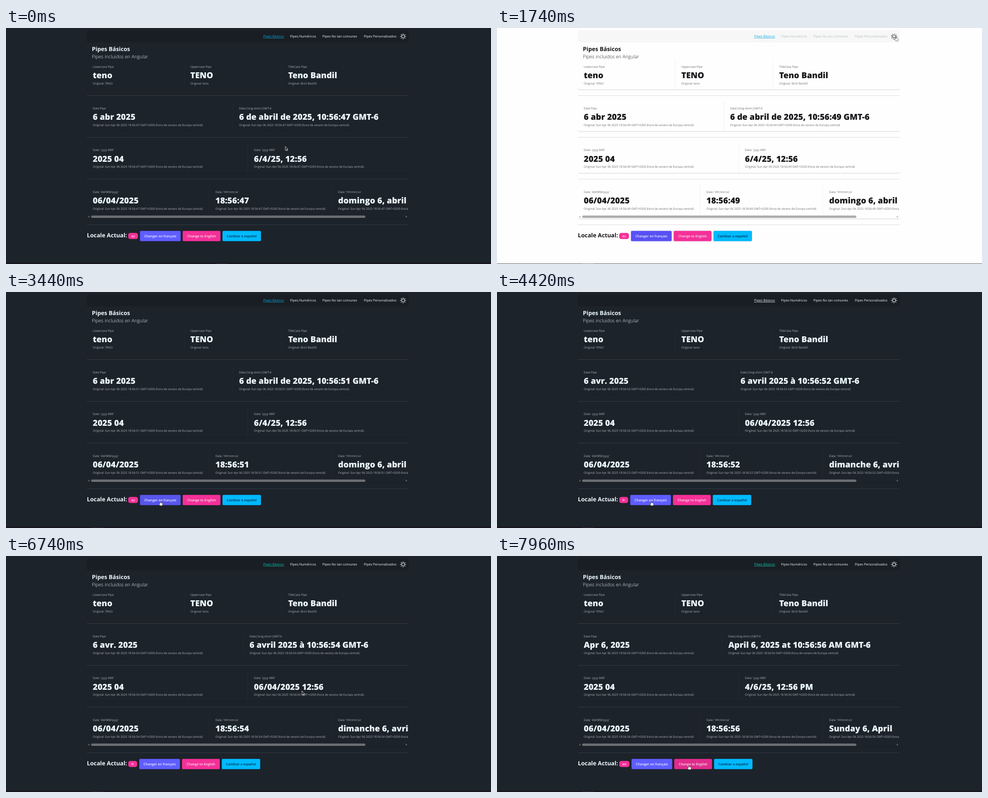
An HTML page that plays this animation: 1073 by 522 pixels, repeating every 7990 ms.

```html
<!DOCTYPE html>
<html lang="es">
<head>
<meta charset="utf-8">
<title>Pipes Básicos</title>
<style>
html, body { margin: 0; width: 100%; height: 100%; overflow: hidden; background: #1d232a; }
svg {
  display: block; width: 1073px; height: 522px;
  font-family: "Open Sans", "Noto Sans", sans-serif;
  text-rendering: geometricPrecision;
  --bg: #1d232a; --nav: #191e24; --ink: #ecf9ff; --soft: #acb6be;
  --line: #343a41; --dash: #2c3239; --thumb: #6c6f73; --strip: #191620; --tab: #37323f;
  --shadow: rgba(0, 0, 0, .1);
}
svg.light {
  --bg: #fefefe; --nav: #f7f7f7; --ink: #18181b; --soft: #6a6a6c;
  --line: #dfdfe0; --dash: #e6e6e7; --thumb: #adadad; --strip: #fefefe; --tab: #777;
  --shadow: rgba(0, 0, 0, .18);
}
.bg { fill: var(--bg); }
.nav { fill: var(--nav); }
.card { fill: var(--bg); filter: drop-shadow(0 1px .7px var(--shadow)); }
.hr { fill: var(--line); }
.dash { stroke: var(--dash); stroke-width: .8; stroke-dasharray: 2 1; }
.thumb { fill: var(--thumb); }
.strip { fill: var(--strip); }
.tab { fill: var(--tab); }
.small { font-size: 6.45px; fill: var(--soft); }
.value { font-size: 18.2px; font-weight: 800; fill: var(--ink); }
.title { font-size: 12.75px; font-weight: 700; fill: var(--ink); }
.sub { font-size: 10.55px; font-weight: 300; fill: var(--ink); }
.link { font-size: 7.35px; fill: var(--link); }
.active { fill: var(--active); text-decoration: underline; }
.btn { filter: drop-shadow(0 .8px .8px rgba(0, 0, 0, .2)); }
.label { font-size: 7.4px; font-weight: 600; text-anchor: middle; }
.icon { color: var(--ink); }
</style>
</head>
<body>
<svg id="stage" viewBox="0 0 1073 522" xmlns="http://www.w3.org/2000/svg">
  <defs><clipPath id="page"><rect x="179" y="0" width="712" height="522"/></clipPath></defs>
  <rect class="bg" width="1073" height="522"/>
  <rect class="nav" x="179" y="5" width="712" height="27" rx="4"/>
  <g id="frame"></g>
  <g id="stats" clip-path="url(#page)"></g>
  <g id="footer"></g>
  <g class="icon" transform="translate(878.5 18.5)">
    <g id="sun" fill="none" stroke="currentColor" stroke-width="1.3" stroke-linecap="round">
      <circle r="3.3"/>
      <path id="rays"/>
    </g>
    <path id="moon" fill="none" stroke="currentColor" stroke-width="1.2" stroke-linejoin="round"
      d="M5.9 2.2A5.1 5.1 0 0 1-1.6-5.8A6.3 6.3 0 1 0 5.9 2.2Z"/>
  </g>
  <rect class="strip" y="519" width="1073" height="3"/>
  <rect id="edge" y="521" width="1073" height="1" fill="#55565a"/>
  <rect id="tab" class="tab" y="521" width="27" height="1"/>
  <g id="ripple">
    <circle r="5.6" fill="#f7a41d" fill-opacity=".75"/>
    <circle r="3.2" fill="none" stroke="#ffd75e" stroke-width="1.2"/>
  </g>
  <g id="cursor">
    <path id="arrow" d="M0 0V8.6L2 6.9L3.3 9.7L4.7 9.1L3.4 6.3H6Z" fill="#111" stroke="#fff" stroke-width=".8" stroke-linejoin="round"/>
    <path id="hand" d="M-.8 .8Q0-.5 .8 .8V3.5Q2 2.8 2.6 3.8Q3.7 3.2 4.1 4.2Q5.4 3.8 5.5 5.1V7L4.6 9.7H.1L-2.6 6.4Q-2.6 5.2-.8 6Z" fill="#fff" stroke="#111" stroke-width=".6" stroke-linejoin="round"/>
  </g>
</svg>
<script>
const LOOP = 7990, FADE = 200;
const LIGHT_ON = 1740, LIGHT_OFF = 2390, FRENCH = 4420, ENGLISH = 7780;
const CLICKS = [1470, 2160, 4110, 7520], CLICK_TIME = 130;
// [time, seconds shown]
const TICKS = [[0, 47], [40, 48], [1055, 49], [2160, 50], [3080, 51], [4100, 52],
  [5380, 53], [6380, 54], [7380, 55], [ENGLISH, 56]];
// [time, x, y] of the pointer tip
const PATH = [[0, 618, 262], [30, 618, 262], [820, 864, 36], [1000, 880, 17], [1330, 882, 19],
  [2600, 882, 19], [2960, 730, 160], [3400, 341, 463], [4870, 341, 463], [5650, 196, 262],
  [5860, 193, 246], [6080, 188, 178], [6480, 786, 203], [7200, 424, 467], [7310, 424, 463], [LOOP, 424, 463]];
const LOCALES = {
  es: { shift: 0, badge: 21.5, split: 502, date: '6 abr 2025', long: s => `6 de abril de 2025, 10:56:${s} GMT-6`, short: '6/4/25, 12:56', day: 'domingo 6, abril' },
  fr: { shift: -1.6, badge: 19.7, split: 525, date: '6 avr. 2025', long: s => `6 avril 2025 à 10:56:${s} GMT-6`, short: '06/04/2025 12:56', day: 'dimanche 6, avril' },
  en: { shift: 1.2, badge: 22.6, split: 498, date: 'Apr 6, 2025', long: s => `April 6, 2025 at 10:56:${s} AM GMT-6`, short: '4/6/25, 12:56 PM', day: 'Sunday 6, April' }
};
const PURPLE = [96, 93, 255], INDIGO = [66, 42, 213], PINK = [244, 48, 152];
const PALE = [236, 249, 255], DARK = [24, 24, 27], CYAN = [9, 169, 220], TEAL = [5, 199, 174];

const $ = id => document.getElementById(id);
const stage = $('stage');
const clamp = v => Math.max(0, Math.min(1, v));
const mix = (a, b, p) => a.map((v, i) => v + (b[i] - v) * p);
const rgb = c => `rgb(${c.map(Math.round)})`;
const text = (x, y, cls, str) => `<text x="${x}" y="${y}" class="${cls}">${str}</text>`;
const rect = (x, y, w, h, cls, rx = 0) => `<rect x="${x}" y="${y}" width="${w}" height="${h}" rx="${rx}" class="${cls}"/>`;
const rowTop = row => 70.5 + row * 92.4;

function drawFrame() {
  let out = text(569, 21.3, 'link active', 'Pipes Básicos')
    + text(628.5, 21.3, 'link', 'Pipes Numéricos')
    + text(700, 21.3, 'link', 'Pipes No tan comunes')
    + text(791.7, 21.3, 'link', 'Pipes Personalizados');
  for (let row = 0; row < 4; row++) out += rect(179, rowTop(row), 712, row < 3 ? 65.5 : 74, 'card', 4);
  for (const y of [149, 241.3, 333.7, 434.6]) out += rect(179, y, 712, 1.1, 'hr');
  out += rect(188.5, 414.7, 606.5, 5.4, 'thumb', 2.7)
    + '<path class="thumb" d="M181.5 417.4l3-2.4v4.8zM887.5 417.4l-3-2.4v4.8z"/>'
    + text(190, 51.2, 'title', 'Pipes Básicos')
    + text(190, 66.8, 'sub', 'Pipes incluidos en Angular');
  $('frame').innerHTML = out;
  $('rays').setAttribute('d', Array.from({ length: 8 }, (_, i) => {
    const c = Math.cos(i * Math.PI / 4), s = Math.sin(i * Math.PI / 4);
    return `M${5.4 * c} ${5.4 * s}L${6.1 * c} ${6.1 * s}`;
  }).join(''));
}

function stat(row, x, label, value, source) {
  const y = rowTop(row);
  const divider = x > 200 ? `<path class="dash" d="M${x - 13.8} ${y}v${row < 3 ? 65 : 64}"/>` : '';
  return divider + text(x, y + 17, 'small', label) + text(x, y + 40.2, 'value', value)
    + text(x, y + 54, 'small', 'Original: ' + source);
}

function drawStats(loc, sec) {
  const now = `Sun Apr 06 2025 18:56:${sec} GMT+0200 (hora de verano de Europa central)`;
  $('stats').innerHTML = [
    [0, 192, 'Lowercase Pipe', 'teno', 'TENO'],
    [0, 407.8, 'Uppercase Pipe', 'TENO', 'teno'],
    [0, 624.2, 'TitleCase Pipe', 'Teno Bandil', 'tEnO BanDIl'],
    [1, 192, 'Date Pipe', loc.date, now],
    [1, loc.split + 13.8, 'Date|long-short|GMT-6', loc.long(sec), now],
    [2, 192, "Date: 'yyyy MM'", '2025 04', now],
    [2, 548.6, "Date: 'yyyy MM'", loc.short, now],
    [3, 192, "Date: 'dd/MM/yyyy'", '06/04/2025', now],
    [3, 463.3, "Date: 'HH:mm:ss'", '18:56:' + sec, now],
    [3, 734.7, "Date: 'HH:mm:ss'", loc.day, now]
  ].map(args => stat(...args)).join('');
}

function button(id, x, w, fill, ink, str) {
  return `<rect id="${id}" class="btn" x="${x}" y="448.8" width="${w}" height="22.6" rx="2.2" fill="${fill}"/>`
    + `<text class="label" x="${x + w / 2}" y="463.3" fill="${ink}">${str}</text>`;
}

function drawFooter(name, { shift, badge }) {
  $('footer').innerHTML = text(179, 463.3, 'title', 'Locale Actual:')
    + `<rect x="270.4" y="453.2" width="${badge}" height="13.6" rx="4.6" fill="${rgb(PINK)}"/>`
    + `<text class="label" x="${270.4 + badge / 2}" y="462.7" fill="#f9e4f0">${name}</text>`
    + button('french', 296.4 + shift, 90, rgb(PURPLE), '#edf1fe', 'Changer en français')
    + button('english', 390.9 + shift, 83.6, rgb(PINK), '#f9e4f0', 'Change to English')
    + button('spanish', 479 + shift, 85, '#00bafe', '#042e49', 'Cambiar a español');
}

function pointerAt(t) {
  const i = PATH.findIndex(p => p[0] > t);
  const [t0, ...a] = PATH[i - 1], [t1, ...b] = PATH[i];
  return mix(a, b, (t - t0) / (t1 - t0));
}

let shown = '';
function render(t) {
  const name = t < FRENCH ? 'es' : t < ENGLISH ? 'fr' : 'en';
  const sec = TICKS.filter(k => k[0] <= t).pop()[1];
  if (shown !== name + sec) {
    shown = name + sec;
    drawStats(LOCALES[name], sec);
    drawFooter(name, LOCALES[name]);
  }

  // Colours and icon are already under way when the new theme first paints.
  const light = t >= LIGHT_ON && t < LIGHT_OFF;
  const day = t < LIGHT_ON ? 0 : light ? clamp((t - LIGHT_ON + 50) / FADE) : 1 - clamp((t - LIGHT_OFF + 35) / FADE);
  stage.classList.toggle('light', light);
  stage.style.setProperty('--link', rgb(mix(PALE, DARK, day)));
  const loaded = name === 'fr' ? FRENCH : ENGLISH;
  stage.style.setProperty('--active', rgb(name === 'es' ? CYAN : mix(PALE, TEAL, clamp((t - loaded) / FADE))));
  $('sun').setAttribute('opacity', 1 - day);
  $('sun').setAttribute('transform', `rotate(${45 * day})`);
  $('moon').setAttribute('opacity', day);
  $('moon').setAttribute('transform', `rotate(${-45 * (1 - day)})`);
  $('edge').setAttribute('visibility', light ? 'visible' : 'hidden');
  $('tab').setAttribute('x', t < 400 ? 463 : 188);

  const [x, y] = pointerAt(t);
  const overButtons = y > 448 && y < 472;
  const onFrench = overButtons && x > 295 && x < 386 && !(t >= FRENCH && t < FRENCH + 80);
  const onEnglish = overButtons && x > 390 && x < 475 && !(t >= ENGLISH && t < ENGLISH + 80);
  const shade = (c, on) => rgb(mix(c, [0, 0, 0], on ? .08 : 0));
  $('french').setAttribute('fill', shade(mix(PURPLE, INDIGO, day), onFrench));
  $('english').setAttribute('fill', shade(PINK, onEnglish));

  const hand = (overButtons && x > 295 && x < 566) || Math.hypot(x - 878.5, y - 18.5) < 9;
  $('arrow').setAttribute('visibility', hand ? 'hidden' : 'visible');
  $('hand').setAttribute('visibility', hand ? 'visible' : 'hidden');
  $('cursor').setAttribute('transform', `translate(${x} ${y})`);

  const click = CLICKS.find(c => t >= c && t < c + CLICK_TIME);
  $('ripple').setAttribute('visibility', click ? 'visible' : 'hidden');
  if (click) $('ripple').setAttribute('transform', `translate(${x} ${y + 1}) scale(${.8 + .45 * (t - click) / CLICK_TIME})`);
}

function loop() {
  render(performance.now() % LOOP);
  requestAnimationFrame(loop);
}
drawFrame();
loop();
</script>
</body>
</html>
```
